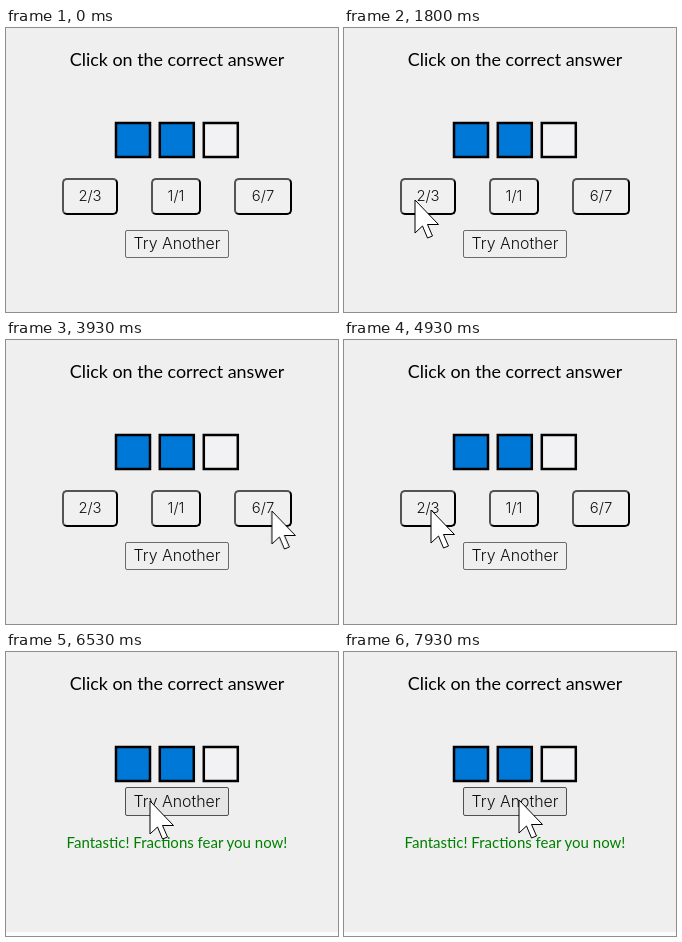
Animation, 332 px wide and 284 px high, one loop 8 s. Source, as an HTML page:

```html
<!DOCTYPE html>
<html lang="en">
<head>
<meta charset="utf-8">
<title>Fraction quiz</title>
<style>
  html, body { margin: 0; width: 100%; height: 100%; overflow: hidden; background: #f0eff0; }
  #stage { position: absolute; left: 0; top: 0; width: 332px; height: 284px; overflow: hidden; color: #000; }
  #stage > * { position: absolute; box-sizing: border-box; }
  .line { left: 0; width: 342px; text-align: center; white-space: nowrap; font-family: Lato, sans-serif; }
  #title { top: 19px; font-size: 17.9px; line-height: 24px; }
  #praise { top: 179px; font-size: 15px; line-height: 22px; color: #008000; }

  #squares { left: 0; top: 0; stroke: #000; stroke-width: 2.5; fill: #0078d7; }

  .button { display: flex; align-items: center; justify-content: center; white-space: nowrap; padding-bottom: 1px;
    font-family: Inter, sans-serif; font-weight: 300; color: #111; }
  .answer { top: 150px; height: 37px; border: 2px outset #000; border-radius: 5px; font-size: 14.8px; background: #f0f0f1; }
  #again { left: 119px; top: 202px; width: 104px; height: 28px; border: 1px solid #6b6b6b; border-radius: 2px;
    font-size: 15.9px; background: #efefef; animation: again 8s step-end infinite; }
  #footer { left: 0; top: 280px; width: 332px; height: 4px; background: #fcfcfc; }

  /* The correct answer is clicked at 5.68 s. */
  .before { animation: before 8s step-end infinite; }
  .after { animation: after 8s step-end infinite; }
  @keyframes before { 0% { visibility: visible } 71%, 100% { visibility: hidden } }
  @keyframes after { 0% { visibility: hidden } 71%, 100% { visibility: visible } }
  @keyframes again {
    0% { top: 202px; height: 28px }
    71% { top: 135px; height: 29px; background: #efefef; border-color: #6b6b6b }
    78.5%, 100% { top: 135px; height: 29px; background: #e5e5e5; border-color: #4f4f4f }
  }

  #cursor { left: 0; top: 0; width: 1px; height: 1px; overflow: visible; animation: move 8s infinite; }
  #arrow { animation: arrow 8s step-end infinite; }
  #beam { animation: beam 8s step-end infinite; }
  @keyframes arrow { 0% { opacity: 1 } 11.2% { opacity: 0 } 14.6%, 100% { opacity: 1 } }
  @keyframes beam { 0% { opacity: 0 } 11.2% { opacity: 1 } 14.6%, 100% { opacity: 0 } }
  @keyframes move {
    0%, 9% { transform: translate(166px, -45px); animation-timing-function: ease-out }
    12.5% { transform: translate(169px, 25px); animation-timing-function: ease-in-out }
    20.5%, 29.5% { transform: translate(71px, 172px); animation-timing-function: ease-in-out }
    36.625% { transform: translate(183px, 171px); animation-timing-function: ease-in-out }
    42%, 48.5% { transform: translate(267px, 171px); animation-timing-function: ease-in-out }
    59.5%, 74% { transform: translate(87px, 170px); animation-timing-function: ease-in-out }
    81.625%, 84% { transform: translate(144px, 149px); animation-timing-function: ease-in-out }
    93%, 100% { transform: translate(175px, 148px) }
  }
</style>
</head>
<body>
<div id="stage">
  <div id="title" class="line">Click on the correct answer</div>
  <svg id="squares" width="332" height="284">
    <rect x="110" y="95" width="34" height="34"/>
    <rect x="153.8" y="95" width="34" height="34"/>
    <rect x="197.8" y="95" width="34" height="34" fill="#f2f1f4"/>
  </svg>
  <div class="button answer before" style="left:56px;width:56px">2/3</div>
  <div class="button answer before" style="left:145px;width:50px">1/1</div>
  <div class="button answer before" style="left:228px;width:58px">6/7</div>
  <div id="again" class="button">Try Another</div>
  <div id="praise" class="line after">Fantastic! Fractions fear you now!</div>
  <div id="footer" class="after"></div>
  <svg id="cursor">
    <path id="arrow" d="M0 0V33L7.5 26 12.5 38 17.5 36 12.5 24.5H23.5Z" fill="#fff" stroke="#000"/>
    <path id="beam" d="M-9 -14H-3L0 -11.5 3 -14H9M0 -12V13M-9 15H-3L0 12.5 3 15H9" fill="none" stroke="#000" stroke-width="3"/>
  </svg>
</div>
</body>
</html>
```
